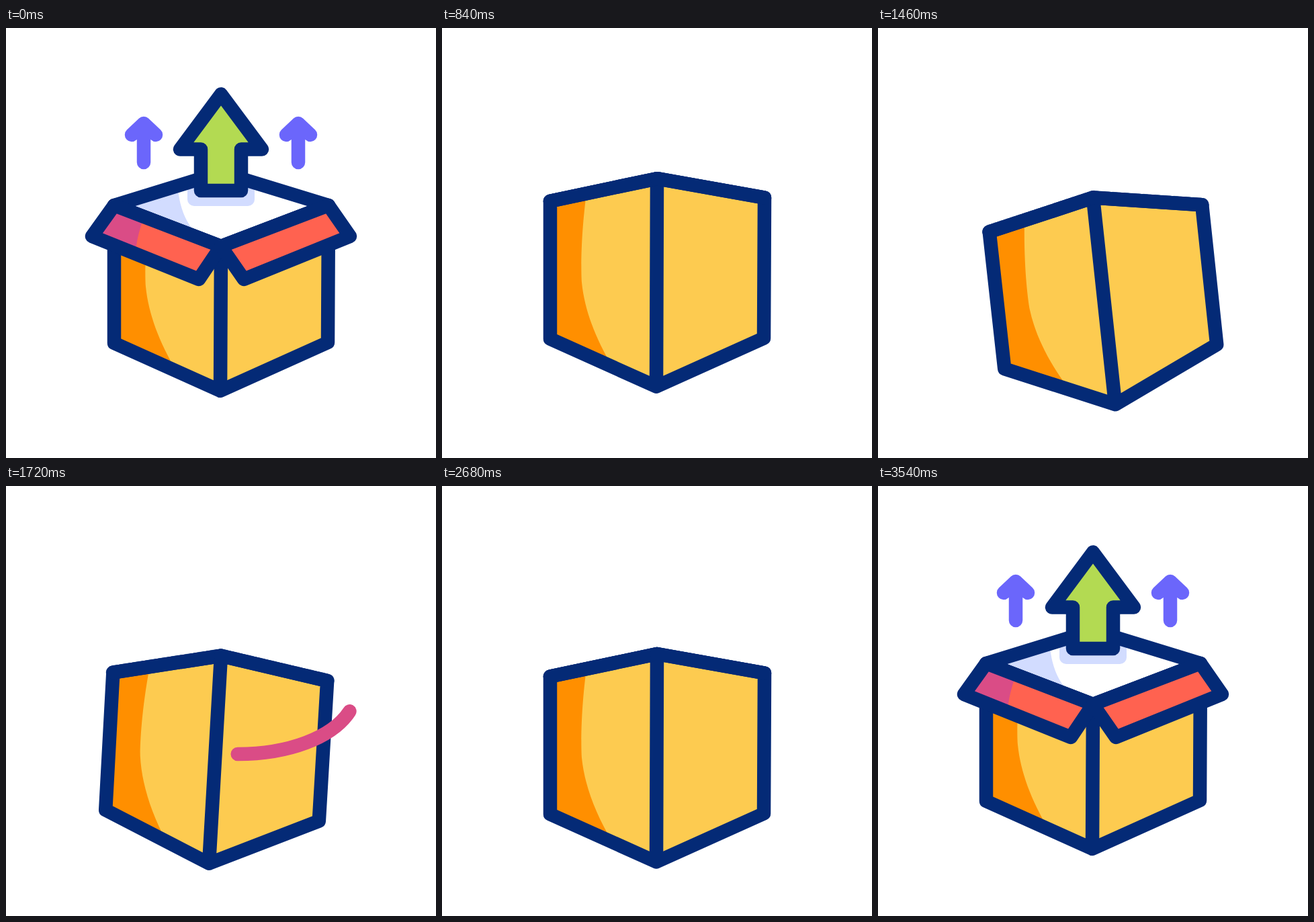
Animation, 640 px wide and 640 px high, one loop 3560 ms. Source, as an HTML page without scripts:

```html
<!DOCTYPE html>
<html lang="en">
<head>
<meta charset="utf-8">
<title>Unboxing loop</title>
<style>
html, body { margin: 0; width: 100%; height: 100%; overflow: hidden; background: #fff; }
svg { display: block; width: 100vw; height: 100vh; }
svg * { animation: 3.56s linear infinite; }

.line { stroke: #042a76; stroke-width: 20.5; stroke-linejoin: round; stroke-linecap: round; }
.swoosh { fill: none; stroke: #da4c86; stroke-width: 20.5; stroke-linecap: round; }
.small { fill: none; stroke: #6b66fb; stroke-width: 20.5; stroke-linecap: round; stroke-linejoin: round; }

/* Box parts: a = open, b = half closed, c = closed, p = flaps peeking, o = flaps overshooting */
.hole, .walls, .shade, .flapL, .flapR { d: var(--a); animation-name: fold; }
.hole {
  --a: path("M161 -276L320 -325L480 -276L320 -215Z");
  --b: path("M161 -276L320 -287L480 -276L320 -271Z");
  --c: path("M161 -276L320 -261L480 -281L320 -309.5Z");
}
.walls {
  --a: path("M161 -276L320 -215L480 -276L479 -72L319 0L161 -71ZM320 -215L319 0");
  --b: path("M161 -276L320 -271L480 -276L479 -72L319 0L161 -71ZM320 -271L319 0");
  --c: path("M161 -276L320 -309.5L480 -281L479 -72L319 0L161 -71ZM320 -309.5L319 0");
}
.shade {
  --a: path("M161 -276L216 -255C206 -220 207 -170 208 -155C212 -115 228 -72 254 -29L161 -71Z");
  --b: path("M161 -276L211 -274C207 -220 207 -170 208 -155C212 -115 228 -72 254 -29L161 -71Z");
  --c: path("M161 -276L215 -288C206 -220 207 -170 208 -155C212 -115 228 -72 254 -29L161 -71Z");
}
.flapL {
  --a: path("M161 -276L320 -215L287 -166L128 -230Z");
  --b: path("M161 -276L318 -271L311 -219L128 -231Z");
  --c: path("M161 -276L320 -309.5L320 -309.5L161 -276Z");
  --p: path("M161 -276L320 -309.5L312 -317L155 -284Z");
  --o: path("M161 -276L320 -215L284 -165L122 -230Z");
}
.flapR {
  --a: path("M480 -276L320 -215L354 -166L512 -230Z");
  --b: path("M480 -276L322 -271L330 -219L514 -229Z");
  --c: path("M480 -281L320 -309.5L320 -309.5L480 -281Z");
  --p: path("M480 -281L320 -309.5L328 -317L482 -288Z");
  --o: path("M480 -276L320 -215L356 -165L515 -230Z");
}
@keyframes fold {
  0%, 6.18% { d: var(--a); }
  15.17% { d: var(--b); }
  19.66%, 78.65% { d: var(--c); }
  81.46% { d: var(--p, var(--c)); }
  86.52% { d: var(--b); }
  91.57% { d: var(--o, var(--a)); }
  95.51%, 100% { d: var(--a); }
}

.box { transform-origin: 319px -310px; animation-name: hop, swing; }
@keyframes hop {
  0%, 6.18% { translate: 0 0; animation-timing-function: cubic-bezier(.37, 0, .63, 1); }
  17.98% { translate: 0 -32px; animation-timing-function: cubic-bezier(.32, 0, .67, 0); }
  25.28% { translate: 0 23.5px; }
  28.1%, 73.03% { translate: 0 22.2px; animation-timing-function: cubic-bezier(.37, 0, .63, 1); }
  81.46% { translate: 0 6px; }
  88.48%, 100% { translate: 0 0; }
}
@keyframes swing {
  0%, 29.35% { rotate: 0deg; animation-timing-function: cubic-bezier(.37, 0, .63, 1); }
  37.08% { rotate: -8.3deg; animation-timing-function: cubic-bezier(.37, 0, .63, 1); }
  53.51% { rotate: 6.4deg; animation-timing-function: cubic-bezier(.37, 0, .63, 1); }
  70.79%, 100% { rotate: 0deg; }
}

.arrow { animation-name: fly; --up: -256px; --down: 180px; }
.small { animation-name: fly; --up: -240px; --down: 170px; }
@keyframes fly {
  0%, 6.18% { translate: 0 0; opacity: 1; animation-timing-function: cubic-bezier(.32, 0, .67, 0); }
  20.79% { translate: 0 var(--up); opacity: 1; }
  20.8%, 83.14% { translate: 0 var(--down); opacity: 0; }
  83.15% { translate: 0 var(--down); opacity: 1; }
  99.44%, 100% { translate: 0 0; opacity: 1; }
}

/* Streaks: a single dash sliding along its path */
.low { stroke-dasharray: 116 900; animation-name: low; }
.high { stroke-dasharray: 185 900; animation-name: high; }
.tape { stroke-dasharray: 102 900; animation-name: tape; }
.pop { stroke: #fdcb50; stroke-dasharray: 39 900; animation-name: pop; }
@keyframes low {
  0%, 30.34% { stroke-dashoffset: 125; }
  32.58% { stroke-dashoffset: -105; }
  37.08%, 100% { stroke-dashoffset: -600; }
}
@keyframes high {
  0%, 44.66% { stroke-dashoffset: 195; }
  48.31% { stroke-dashoffset: -219; }
  50.84%, 100% { stroke-dashoffset: -480; }
}
@keyframes tape {
  0%, 59.55% { stroke-dashoffset: 110; }
  62.92% { stroke-dashoffset: 0; }
  66.01%, 100% { stroke-dashoffset: -110; }
}
@keyframes pop {
  0%, 31.74% { stroke-dashoffset: 45; }
  32.58% { stroke-dashoffset: 26; }
  36.52% { stroke-dashoffset: 0; }
  39.33%, 100% { stroke-dashoffset: -45; }
}
</style>
</head>
<body>
<svg viewBox="0 0 640 640">
  <defs>
    <clipPath id="inHole"><path class="hole"/></clipPath>
    <clipPath id="inFlap"><path class="flapL"/></clipPath>
  </defs>

  <path class="small" d="M205 200V142M187 159L205 142L223 159"/>
  <path class="small" d="M435 200V142M417 159L435 142L453 159"/>

  <g transform="translate(0 540)">
    <g class="box">
      <path class="hole" fill="#fff"/>
      <g clip-path="url(#inHole)" fill="#d2dcff">
        <path d="M150 -310H255Q258 -262 280 -238H150Z"/>
        <rect x="270" y="-320" width="100" height="45" rx="10"/>
      </g>
      <path class="hole line" fill="none"/>
    </g>
  </g>

  <path class="arrow line" fill="#b3da52" d="M320 98.5L259 180.5H290V242H350V180.5H381Z"/>

  <g transform="translate(0 540)">
    <g class="box">
      <path class="walls" fill="#fdcb50"/>
      <path class="shade" fill="#ff8f00"/>
      <path class="walls line" fill="none"/>
      <path class="flapL" fill="#ff6250"/>
      <g clip-path="url(#inFlap)">
        <path fill="#da4c86" d="M110 -320H232Q192 -240 193 -200H110Z"/>
      </g>
      <path class="flapL line" fill="none"/>
      <path class="flapR line" fill="#ff6250"/>
    </g>
  </g>

  <path class="swoosh pop" d="M318 236L316 197"/>
  <path class="swoosh low" d="M47 455C75 490 110 497 137 505Q195 525 249 505C380 470 480 420 514 330"/>
  <path class="swoosh high" d="M140 330C190 385 270 399 345 399C420 399 485 375 511 336L531 300"/>
  <path class="swoosh tape" d="M181 441L273 484"/>
  <path class="swoosh tape" d="M341 489L439 462"/>
</svg>
</body>
</html>
```
